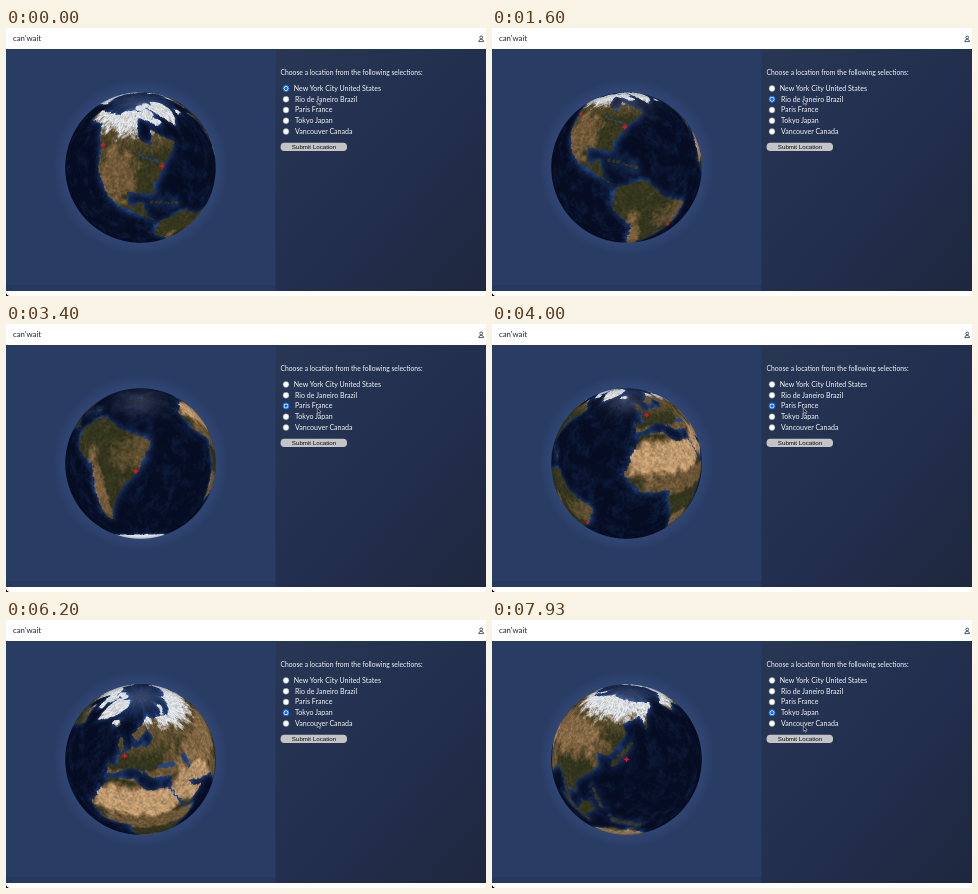
An HTML page with a canvas that plays this animation: 480x268 px, repeating every 8000 ms.

```html
<!DOCTYPE html>
<html lang="en">
<head>
<meta charset="utf-8">
<title>Pick a location</title>
<style>
html, body { margin: 0; width: 100%; height: 100%; overflow: hidden; background: #fff; }
svg { position: absolute; left: 0; top: 0; width: 480px; height: 268px; display: block; }
canvas { position: absolute; left: 56px; top: 61px; width: 157px; height: 157px; }
text { font-family: Lato, "Open Sans", sans-serif; fill: #f4f6fa; }
</style>
</head>
<body>
<svg viewBox="0 0 480 268">
  <defs>
    <linearGradient id="side" x1="0" y1="0" x2="1" y2="1">
      <stop offset="0" stop-color="#283754"/>
      <stop offset=".5" stop-color="#222f4f"/>
      <stop offset="1" stop-color="#1e273e"/>
    </linearGradient>
    <radialGradient id="glow">
      <stop offset=".84" stop-color="#3a5690" stop-opacity=".42"/>
      <stop offset="1" stop-color="#3a5690" stop-opacity="0"/>
    </radialGradient>
  </defs>
  <rect width="480" height="268" fill="#fff"/>
  <rect y="21" width="270" height="242" fill="#293c64"/>
  <rect y="257" width="270" height="6" fill="#253860"/>
  <rect x="269.4" y="21" width="210.6" height="242" fill="url(#side)"/>
  <path d="M0 268v-3q1 2 3 3z" fill="#111"/>
  <circle cx="134.5" cy="139" r="88" fill="url(#glow)"/>
  <text x="7" y="13" font-size="7.8" style="fill:#17233f">can'wait</text>
  <g fill="none" stroke="#26314c" stroke-width=".8">
    <circle cx="475.2" cy="9.4" r="1.4"/>
    <path d="M472.8 13.6q0-2.2 2.4-2.2t2.4 2.2z"/>
  </g>
  <text x="274.5" y="47" font-size="6.75">Choose a location from the following selections:</text>
  <g id="options"></g>
  <rect x="274.6" y="114.7" width="66.4" height="8.4" rx="3.8" fill="#c4c4c6"/>
  <text x="308" y="121.2" font-size="6.2" text-anchor="middle" style="font-family:'Liberation Sans',sans-serif;fill:#0c0c0c">Submit Location</text>
  <path id="cursor" d="M0 0v5.4l1.3-1.1 .9 2 .9-.4-.9-1.9h1.7z" fill="#15181f" stroke="#e8ebf2" stroke-width=".5"/>
</svg>
<canvas id="globe" width="314" height="314"></canvas>

<script>
const LOOP = 8000, TURN = 2000, GLIDE = 500;
const W = 1080, H = 540;
const R = 150.5, C = 157, CAM = 2.8, RAD = Math.PI / 180;
const $ = id => document.getElementById(id);
const clamp = v => Math.max(0, Math.min(1, v));
const mix = (a, b, k) => a + (b - a) * k;
const blend = (a, b, k) => a.map((v, i) => mix(v, b[i], k));
const rgb = hex => [1, 3, 5].map(i => parseInt(hex.slice(i, i + 2), 16));
const cubic = u => u < .5 ? 4 * u ** 3 : 1 - 4 * (1 - u) ** 3;

// ---- options ----
const cities = [
  { name: "New York City United States", at: [-74, 40.7] },
  { name: "Rio de Janeiro Brazil", at: [-43.2, -22.9] },
  { name: "Paris France", at: [2.35, 48.86] },
  { name: "Tokyo Japan", at: [139.7, 35.7] },
  { name: "Vancouver Canada", at: [-123.1, 49.3] }
];
$("options").innerHTML = cities.map(({ name }, i) => {
  const y = 60.5 + 10.75 * i;
  return `<circle class="ring" cx="280" cy="${y}" r="2.9" fill="#fff"/>
    <circle class="dot" cx="280" cy="${y}" r="1.7" fill="#0b6ef0"/>
    <text x="${i ? 289 : 287.8}" y="${y + 2.3}" font-size="7.05">${name}</text>`;
}).join("");
const rings = document.querySelectorAll(".ring"), dots = document.querySelectorAll(".dot");

// ---- noise ----
function hash(x, y) {
  let n = Math.imul(x, 374761393) + Math.imul(y, 668265263);
  n = Math.imul(n ^ (n >>> 13), 1274126177);
  return ((n ^ (n >>> 16)) >>> 0) / 4294967296;
}
function noise(x, y) {
  const i = Math.floor(x), j = Math.floor(y);
  let u = x - i, v = y - j;
  u *= u * (3 - 2 * u);
  v *= v * (3 - 2 * v);
  return mix(mix(hash(i, j), hash(i + 1, j), u), mix(hash(i, j + 1), hash(i + 1, j + 1), u), v);
}
const fbm = (x, y) => noise(x, y) * .55 + noise(x * 2.1, y * 2.1) * .3 + noise(x * 4.3, y * 4.3) * .15 - .5;

// ---- land mask: rough outlines in degrees, made ragged by noise later ----
function layer() {
  const c = document.createElement("canvas");
  c.width = W;
  c.height = H;
  return c.getContext("2d", { willReadFrequently: true });
}
const mask = layer(), blurred = layer();
const mapX = lon => (lon + 180) * W / 360, mapY = lat => (90 - lat) * H / 180;

function coast(...p) {
  mask.beginPath();
  for (let i = 0; i < p.length; i += 2) mask.lineTo(mapX(p[i]), mapY(p[i + 1]));
  mask.fill();
}
// A chain of n blobs along a line, used for islands and for lakes.
function chain(n, size, lon0, lat0, lon1, lat1) {
  for (let i = 0; i < n; i++) {
    const k = i / (n - 1), lat = mix(lat0, lat1, k), r = size * (.8 + .5 * hash(i, n)) * W / 360;
    mask.beginPath();
    mask.ellipse(mapX(mix(lon0, lon1, k)), mapY(lat), r / Math.cos(lat * RAD), r, 0, 0, 7);
    mask.fill();
  }
}
function drawLand() {
  mask.fillStyle = "#fff";
  // Americas and Greenland
  coast(-166,66, -128,70, -94,72, -92,58, -80,52, -78,62, -57,52, -70,43, -81,31, -81,26, -97,28, -96,19, -88,21,
    -84,10, -78,8, -105,20, -117,33, -124,48, -140,60, -160,57);
  coast(-78,8, -62,11, -50,0, -35,-7, -41,-22, -55,-34, -68,-52, -74,-50, -70,-18, -81,-5);
  coast(-45,60, -55,70, -70,78, -35,83, -18,78, -25,70);
  // Africa and Arabia
  coast(-6,36, 10,37, 20,31, 33,31, 43,12, 51,11, 40,-5, 35,-24, 20,-35, 9,0, 9,4, -8,5, -17,15);
  coast(48,30, 51,25, 59,22, 45,13, 35,29, 37,38, 62,38, 62,25);
  // Europe and Asia
  coast(-9,37, -9,43, -1,44, -4,48, 8,54, 20,54, 29,60, 22,64, 12,57, 5,61, 26,71, 60,69, 60,37, 27,37, 23,38,
    13,45, 18,40, 9,44, 0,40);
  coast(58,68, 104,77, 180,68, 162,60, 157,51, 155,60, 136,55, 140,50, 128,37, 119,38, 122,30, 108,20, 108,11,
    100,12, 103,2, 98,8, 97,16, 90,22, 80,12, 77,8, 72,21, 58,26);
  // Australia and Antarctica
  coast(114,-22, 131,-12, 140,-17, 143,-11, 153,-27, 147,-39, 131,-32, 116,-35);
  coast(-180,-72, 180,-70, 180,-90, -180,-90);
  // islands
  chain(6, 3, -118,71, -78,73);
  chain(5, 2.6, -84,72, -66,66);
  chain(4, 2.5, -92,78, -70,81);
  chain(7, .9, -83,22, -67,18);
  chain(2, 1.5, -20,65, -17,65);
  chain(4, 1.6, -1.5,52, -4,57.5);
  chain(5, 1.3, 54,71, 66,76);
  chain(9, 1.2, 131,33, 143,44);
  chain(5, 1.5, 121,17, 125,7);
  chain(8, 1.5, 97,4, 114,-8);
  chain(3, 3.4, 112,-1, 116,4);
  chain(4, 2.4, 133,-3, 147,-8);
  chain(4, 1.8, 45,-23, 49,-14);
  // lakes and inland seas
  mask.fillStyle = "#000";
  chain(5, 1.6, 30,43, 39,42.5);
  chain(5, 1.6, 50,45, 52,38);
  chain(6, .7, -90,47.5, -77,43.5);
  blurred.filter = "blur(7px)";
  blurred.drawImage(mask.canvas, 0, 0);
}

// ---- ground: forest, brown and sand by dryness, then snow by latitude ----
const deep = rgb("#060d22"), shelf = rgb("#234587"), snow = rgb("#e9eef5");
const forest = rgb("#33351d"), brown = rgb("#775d3b"), sand = rgb("#c19c70");
const dryLands = [
  { lon: 12, lat: 23, w: 32, h: 10, dry: 1 },
  { lon: 52, lat: 28, w: 18, h: 11, dry: .9 },
  { lon: 82, lat: 43, w: 42, h: 13, dry: .58 },
  { lon: 76, lat: 21, w: 8, h: 9, dry: .4 },
  { lon: 20, lat: 39, w: 30, h: 3, dry: .4 },
  { lon: 25, lat: 7, w: 30, h: 7, dry: .4 },
  { lon: 22, lat: -25, w: 11, h: 10, dry: .5 },
  { lon: 132, lat: -25, w: 20, h: 10, dry: .7 },
  { lon: -107, lat: 36, w: 14, h: 15, dry: .48 },
  { lon: -69, lat: -32, w: 5, h: 22, dry: .5 },
  { lon: -44, lat: -13, w: 11, h: 10, dry: .3 }
];
function ground(lon, lat, n, m) {
  let dry = clamp((lat - 46) / 12) * .35;
  for (const p of dryLands) {
    const d = Math.hypot((lon - p.lon) / p.w, (lat - p.lat) / p.h);
    dry = Math.max(dry, p.dry * clamp((1.25 - d + n * .7) * 2.2));
  }
  dry = clamp(dry + n * .25 + m * .15);
  const col = dry < .5 ? blend(forest, brown, dry * 2) : blend(brown, sand, dry * 2 - 1);
  const line = 56 + 11 * Math.exp(-(((lon - 20) / 36) ** 2));
  const white = lat < -66 ? 1 : clamp((lat - line) / 6 + n * 2.4 + m) * clamp(.9 + m * .9);
  return blend(col.map(v => v * (1 + m * .45)), snow, white);
}
function sea(lat, near, n, m) {
  const a = Math.pow(near, .8) * 1.1 * (1 + n) + Math.max(0, n + m * .5 + .06) * .55 + .3 * clamp((lat - 66) / 8);
  return blend(deep, shelf, clamp(a));
}

const map = new Uint8ClampedArray(W * H * 3), wet = new Uint8Array(W * H);
function paintMap() {
  drawLand();
  const solid = mask.getImageData(0, 0, W, H).data, soft = blurred.getImageData(0, 0, W, H).data;
  for (let y = 0; y < H; y++) for (let x = 0; x < W; x++) {
    const lon = x * 360 / W - 180, lat = 90 - y * 180 / H;
    const n = fbm(x / 16, y / 16), m = fbm(x / 4 + 90, y / 4);
    const sx = Math.round(x + m * 9 + W) % W, sy = Math.max(0, Math.min(H - 1, Math.round(y + n * 8)));
    const s = (sy * W + sx) * 4, k = y * W + x;
    const dryGround = solid[s] > 127 && solid[s + 3] > 127;
    wet[k] = dryGround ? 0 : 1;
    map.set(dryGround ? ground(lon, lat, n, m) : sea(lat, soft[s + 3] / 255, n, m), k * 3);
  }
}

// ---- globe: one ray per pixel, seen by a camera at distance CAM ----
const ctx = $("globe").getContext("2d");
const img = ctx.createImageData(C * 2, C * 2);
const limb = Math.sqrt(CAM * CAM - 1);
const rays = [];
for (let j = 0; j < C * 2; j++) for (let i = 0; i < C * 2; i++) {
  const px = (i + .5 - C) / R, py = (C - j - .5) / R, r = Math.hypot(px, py);
  if (r > 1.01) continue;
  const f = Math.min(1, .998 / r) / limb;
  const X = px * f, Y = py * f, q = 1 + X * X + Y * Y;
  const t = (CAM - Math.sqrt(Math.max(0, CAM * CAM - q * limb * limb))) / q;
  const z = CAM - t;
  rays.push({
    o: (j * C * 2 + i) * 4, x: X * t, y: Y * t, z,
    light: Math.min(1, .7 + .75 * (CAM * z - 1) / (CAM - 1)),
    shine: 38 * Math.exp(-((px / .3) ** 2) - ((py - .82) / .15) ** 2),
    alpha: 255 * clamp((1 - r) * R + .5)
  });
}
function drawGlobe(lon, lat) {
  const s = Math.sin(lat * RAD), c = Math.cos(lat * RAD), d = img.data;
  for (const p of rays) {
    const la = Math.asin(p.y * c + p.z * s), lo = lon + Math.atan2(p.x, p.z * c - p.y * s) / RAD;
    const u = Math.floor(((lo + 540) % 360) * W / 360), v = Math.min(H - 1, Math.floor((.5 - la / Math.PI) * H));
    const k = v * W + u, add = wet[k] * p.shine;
    for (let i = 0; i < 3; i++) d[p.o + i] = map[k * 3 + i] * p.light + add;
    d[p.o + 3] = p.alpha;
  }
  ctx.putImageData(img, 0, 0);
  ctx.fillStyle = "#dc171c";
  for (const city of cities) drawPin(city.at, lon, s, c);
}
function drawPin([lon, lat], lon0, s, c) {
  const a = (lon - lon0) * RAD, sp = Math.sin(lat * RAD), cp = Math.cos(lat * RAD);
  const z = sp * s + cp * c * Math.cos(a);
  if (z < .62) return;
  const k = R * limb / (CAM - z), x = C + cp * Math.sin(a) * k, y = C - (sp * c - cp * s * Math.cos(a)) * k;
  const arm = 5 * z;
  ctx.beginPath();
  ctx.arc(x, y, arm * .6, 0, 7);
  ctx.fill();
  ctx.fillRect(x - arm, y - 1.2, arm * 2, 2.4);
  ctx.fillRect(x - 1.2, y - arm, 2.4, arm * 2);
}

// ---- timeline ----
const clicks = [{ t: 706, city: 1 }, { t: 2920, city: 2 }, { t: 5630, city: 3 }];
const moves = [{ t: 2450, y: 84 }, { t: 4600, y: 91 }, { t: 5900, y: 106 }];

function render(t) {
  let pos = [-89.3, 41], picked = 0, y = 71;
  for (const click of clicks) if (t >= click.t) {
    pos = blend(pos, cities[click.city].at, cubic(clamp((t - click.t) / TURN)));
    picked = click.city;
  }
  for (const move of moves) y = mix(y, move.y, cubic(clamp((t - move.t) / GLIDE)));
  drawGlobe(...pos);
  rings.forEach((ring, i) => {
    ring.setAttribute("stroke", i === picked ? "#0b6ef0" : "#8d93a0");
    ring.setAttribute("stroke-width", i === picked ? 1 : .5);
    dots[i].setAttribute("visibility", i === picked ? "visible" : "hidden");
  });
  $("cursor").setAttribute("transform", `translate(311.3 ${y})`);
}

paintMap();
render(0);
const start = performance.now();
(function tick() {
  render((performance.now() - start) % LOOP);
  requestAnimationFrame(tick);
})();
</script>
</body>
</html>
```
